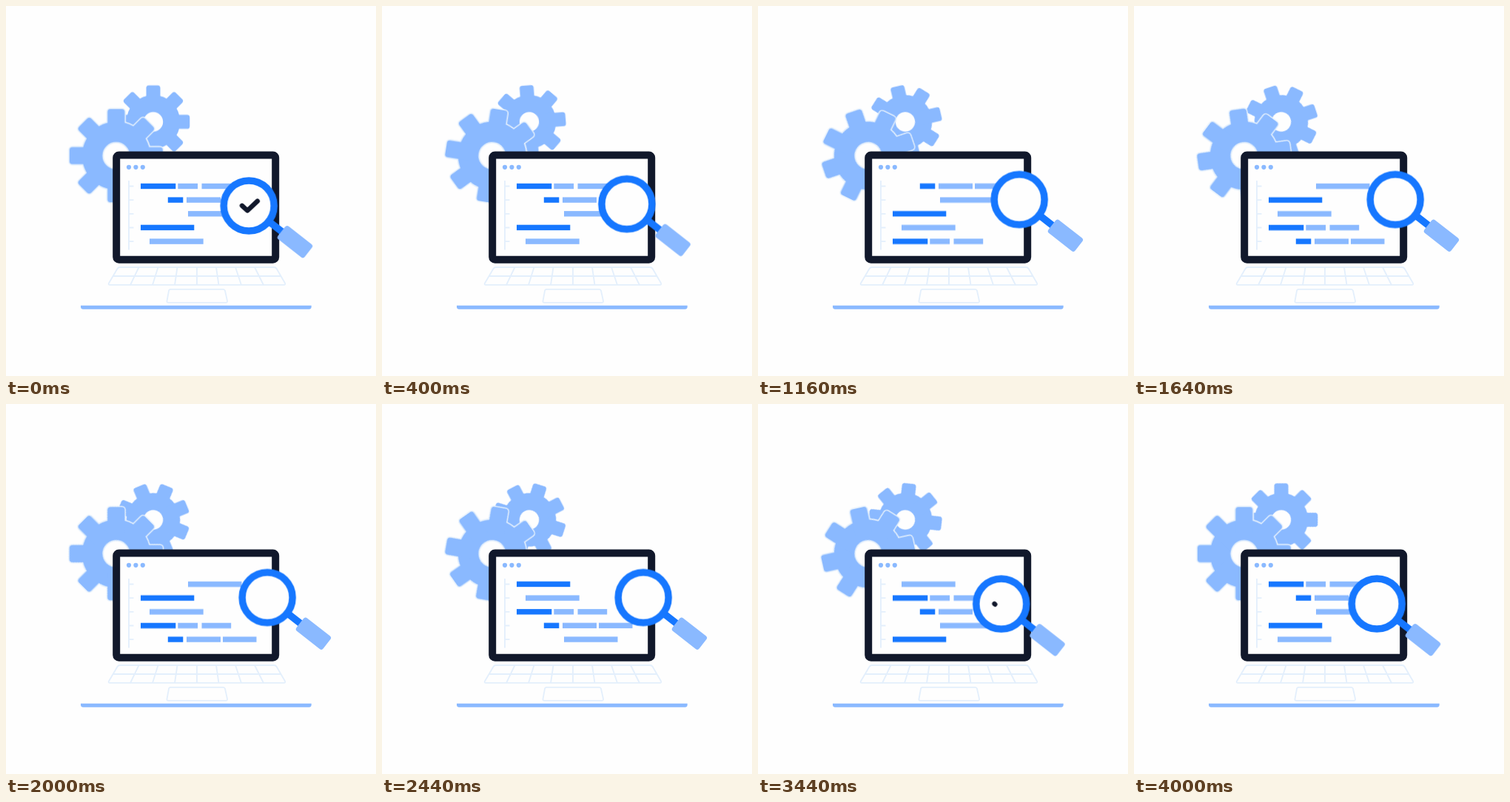
An HTML page that plays this animation: 500 px wide and 500 px high, repeating every 4040 ms.

```html
<!DOCTYPE html>
<html lang="en">
<head>
<meta charset="utf-8">
<title>Code check</title>
<style>
  :root { --paper: #fefefe; --ink: #11182b; --blue: #1677ff; --sky: #8ab9ff; --pale: #e3effc; }
  html, body { margin: 0; width: 100%; height: 100%; overflow: hidden; background: var(--paper); }
  svg { display: block; width: 100%; height: 100%; }

  .paper { fill: var(--paper); }
  .blue { fill: var(--blue); }
  .sky { fill: var(--sky); }
  .line { fill: none; stroke: var(--pale); stroke-width: 1.8; stroke-linejoin: round; }
  .rim { fill: var(--pale); stroke: var(--pale); stroke-width: 3.2; }

  .big, .small, .rows, .lens, .tick { animation: 4040ms linear infinite; }

  /* The motion ends at 4000 ms (99.01%) and rests until the loop restarts. */
  .big { animation-name: spin-big; }
  .small { animation-name: spin-small; }
  @keyframes spin-big { 99.01%, 100% { transform: rotate(90deg); } }
  @keyframes spin-small { 99.01%, 100% { transform: rotate(-45deg); } }

  /* One line up every 800 ms */
  .rows { animation-name: scroll; animation-timing-function: steps(5); }
  @keyframes scroll { 99.01%, 100% { transform: translateY(-93.25px); } }

  .lens {
    offset-path: path("M328.2 270 Q340.6 257.8 353.2 261.5 Q348 275 328.2 270");
    offset-rotate: 0deg;
    animation-name: sweep;
    animation-timing-function: cubic-bezier(.333, 0, .667, 1);
  }
  @keyframes sweep {
    0%, 4.7% { offset-distance: 0%; }
    28.47%, 64.85% { offset-distance: 48.8%; }
    86.88%, 100% { offset-distance: 100%; }
  }

  .tick {
    fill: none; stroke: var(--ink); stroke-width: 6.4;
    stroke-linecap: round; stroke-linejoin: round;
    stroke-dasharray: 1 2;
    animation-name: draw, show;
    animation-duration: 4040ms;
    animation-iteration-count: infinite;
    animation-timing-function: cubic-bezier(.333, 0, .667, 1), step-end;
  }
  @keyframes draw {
    0% { stroke-dashoffset: 0; }
    7.92%, 84.16% { stroke-dashoffset: 1; }
    93.07%, 100% { stroke-dashoffset: 0; }
  }
  @keyframes show {
    0% { opacity: 1; }
    7.92% { opacity: 0; }
    84.16% { opacity: 1; }
    99%, 100% { opacity: 0; }
  }
</style>
</head>
<body>
<svg viewBox="0 0 500 500">
  <defs>
    <rect id="big-bar" x="-63" y="-11.6" width="126" height="23.2" rx="4"/>
    <g id="big-gear">
      <circle r="46"/>
      <use href="#big-bar"/>
      <use href="#big-bar" transform="rotate(45)"/>
      <use href="#big-bar" transform="rotate(90)"/>
      <use href="#big-bar" transform="rotate(135)"/>
    </g>
    <rect id="small-bar" x="-49.3" y="-9.5" width="98.6" height="19" rx="3.6"/>
    <clipPath id="page"><rect x="160" y="234" width="196" height="93.25"/></clipPath>
  </defs>

  <g transform="translate(199 156.5)">
    <g class="small sky">
      <circle r="36.3"/>
      <use href="#small-bar"/>
      <use href="#small-bar" transform="rotate(45)"/>
      <use href="#small-bar" transform="rotate(90)"/>
      <use href="#small-bar" transform="rotate(135)"/>
      <circle class="paper" r="13.2"/>
    </g>
  </g>

  <g transform="translate(148.8 202.3)">
    <g class="big">
      <use href="#big-gear" class="rim"/>
      <use href="#big-gear" class="sky"/>
      <circle class="paper" r="17.6" stroke="#e3effc" stroke-width="1.8"/>
    </g>
  </g>

  <!-- Laptop -->
  <rect x="149.2" y="201.5" width="215" height="141.3" rx="3.5" fill="#fefefe" stroke="#11182b" stroke-width="10"/>
  <g class="sky">
    <circle cx="166" cy="217.8" r="3.1"/>
    <circle cx="175.4" cy="217.8" r="3.1"/>
    <circle cx="184.8" cy="217.8" r="3.1"/>
  </g>
  <path class="line" d="M166 236V329.5M166 243.5h6.5M166 262.2h6.5M166 280.8h6.5M166 299.5h6.5M166 318.1h6.5"/>

  <g clip-path="url(#page)">
    <g class="rows">
      <g id="code" class="sky">
        <rect class="blue" x="182" y="239.8" width="47.3" height="7.4"/>
        <rect x="232.3" y="239.8" width="26.8" height="7.4"/>
        <rect x="264.5" y="239.8" width="39.7" height="7.4"/>
        <rect class="blue" x="218.8" y="258.4" width="20.5" height="7.4"/>
        <rect x="244" y="258.4" width="46" height="7.4"/>
        <rect x="293" y="258.4" width="45.5" height="7.4"/>
        <rect x="246" y="277.1" width="72.5" height="7.4"/>
        <rect class="blue" x="182" y="295.7" width="72.3" height="7.4"/>
        <rect x="194" y="314.4" width="72.7" height="7.4"/>
      </g>
      <use href="#code" y="93.25"/>
    </g>
  </g>

  <!-- Keyboard, touchpad and base -->
  <g class="line">
    <path d="M154 353H362Q364.500 353 365.700 355L377 374.500Q378 376.800 375.500 376.800H140.500Q137.800 376.800 139 374.500L150.500 355Q151.600 353 154 353Z"/>
    <path d="M145 365H371M179.500 353L168 377M205.500 353L198 377M231.500 353L228 377M258 353V377M284 353L287.500 377M310 353L318 377M336 353L348 377"/>
    <path d="M222.500 382.800H293.500Q295.500 382.800 296 384.800L299 398.500Q299.400 400.800 297 400.800H219.500Q217 400.800 217.500 398.500L220 384.800Q220.400 382.800 222.500 382.800Z"/>
  </g>
  <path class="sky" d="M101 404.800H412.700V406.500Q412.500 409.700 409.500 409.700H104.200Q101.200 409.700 101 406.500Z"/>

  <g class="lens">
    <g transform="rotate(38)">
      <rect class="blue" x="34" y="-4.800" width="26" height="9.600"/>
      <rect class="sky" x="56" y="-11.200" width="46" height="22.400" rx="3.600"/>
    </g>
    <circle class="paper" r="34" stroke="#1677ff" stroke-width="9.500"/>
    <path class="tick" pathLength="1" d="M-9.200 -.2L-2 6.500L11.600 -6.400"/>
  </g>
</svg>
</body>
</html>
```
